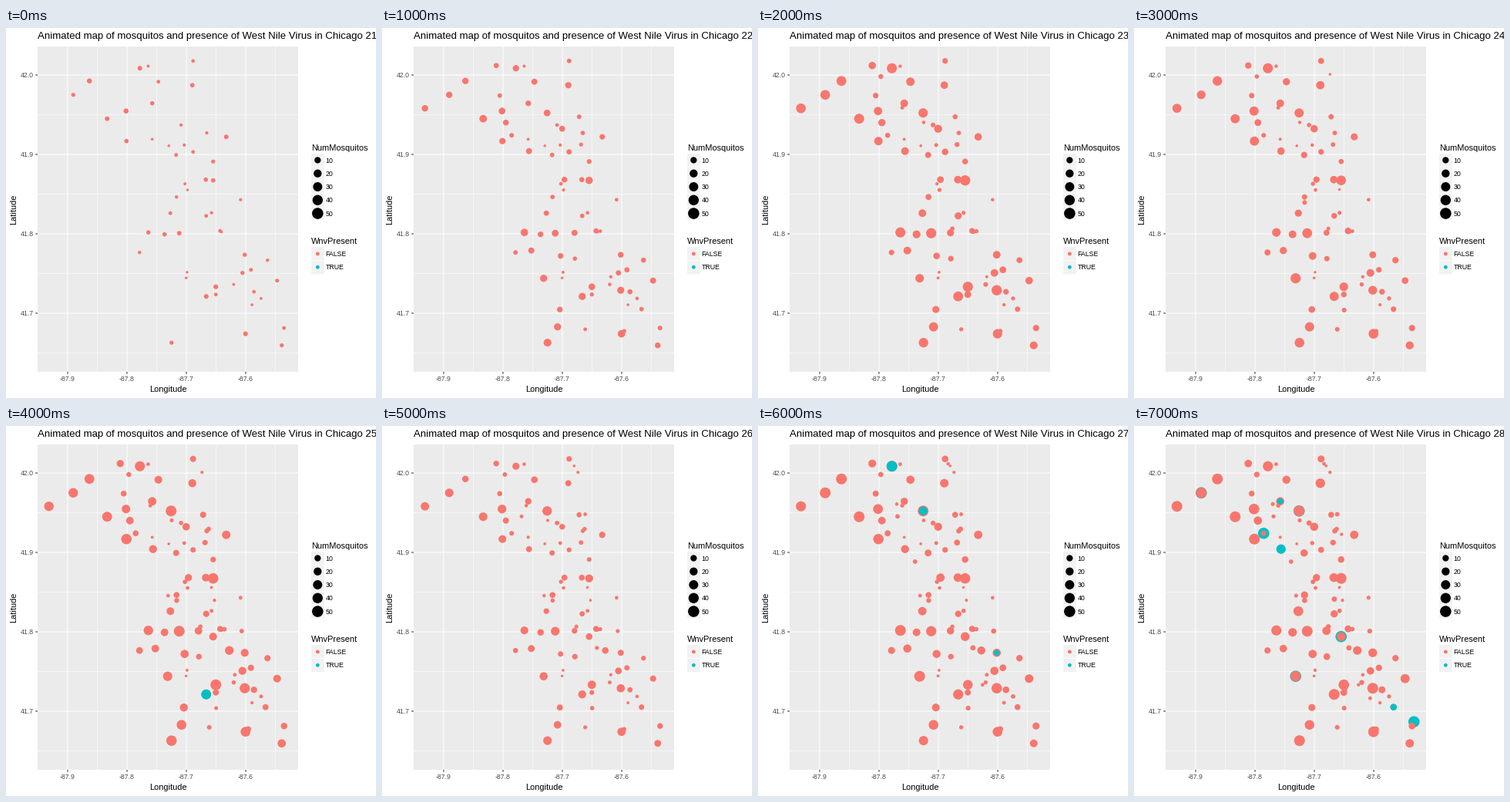
A matplotlib script that plays this animation: 480 px wide and 480 px high, repeating every 8 s.

```python
import numpy as np
import matplotlib.pyplot as plt
from matplotlib.animation import FuncAnimation
from matplotlib.patches import Circle, Rectangle

plt.rcParams["font.family"] = "Liberation Sans"

SIZE, DPI = 480, 72
SALMON, TEAL = "#F8766D", "#00BFC4"
FIRST_WEEK, WEEKS = 21, 8
LEFT, RIGHT, TOP, BOTTOM = 41, 379, 24, 446
MAX_RADIUS = 7

# Main traps: opening week, usual dot radius, places.
MAIN_TRAPS = [
    (21, 6.8, [(174, 52.5), (108.5, 69), (87.5, 87), (156, 108), (131.5, 118), (156.5, 147),
               (269, 198), (185, 265.5), (225, 266.5), (272.5, 336), (260, 348.5),
               (311, 397), (215, 408.5)]),
    (21, 5.4, [(198, 70), (242, 74.5), (190, 98), (286, 141.5), (259.5, 197), (213.5, 240.5),
               (206, 268), (310, 294.5), (307, 318), (352, 328), (358, 412)]),
    (21, 4.2, [(243, 43), (221, 165), (243, 161), (269, 173.5), (221.5, 219.5), (260, 244),
               (278, 263.5), (173.5, 291.5), (339.5, 301.5), (318, 314), (272.5, 346),
               (322, 342.5), (361, 389.5)]),
    (22, 6.8, [(56, 104.5), (214.5, 110.5), (210, 325), (310, 340.5), (228, 388)]),
    (22, 5, [(148.5, 49), (161, 123), (234, 131), (191, 160), (237, 197), (250, 266),
             (194, 289), (232, 296), (231, 365.5)]),
    (22, 3.8, [(153, 88), (256, 115.5), (168.5, 139.5), (258.5, 151.5), (250.5, 299.5),
               (337, 365)]),
    (25, 5.5, [(269, 273.5), (290, 291.5)]),
]
# How far the catches have grown from the smallest dot to their usual size.
SEASON = [0.25, 0.55, 0.9, 0.85, 0.92, 0.68, 1, 1.05]

# Positive catches: rings behind the dots, and (x, y, radius) on top of them.
VIRUS_RINGS = {28: [(87.5, 87), (214.5, 110.5), (168.5, 139.5), (269, 273.5),
                    (210, 325), (363.5, 384)]}
VIRUS_DOTS = {25: [(260, 348.5, 6.4)],
              27: [(174, 52.5, 6.9), (214.5, 110.5, 5.6), (310, 294.5, 3.7)],
              28: [(191, 160, 6.1), (190, 98, 3.8), (337, 365, 4.3)]}


def minor_traps(count):
    """Small traps scattered along the city's north-west to south-east band."""
    rng = np.random.default_rng(7)
    y = rng.uniform(48, 395, count)
    x = 185 + 0.3 * y + rng.uniform(-55, 55, count)
    return np.column_stack([x, y, rng.uniform(1.8, 3.4, count)])


MINOR = minor_traps(44)


def catches(frame):
    week = FIRST_WEEK + frame
    rng = np.random.default_rng(week)
    sites = [(x, y, r) for opened, r, places in MAIN_TRAPS if opened <= week
             for x, y in places]
    sites = np.vstack([sites, MINOR[:16 + 4 * frame]])
    spread = rng.normal(1, 0.06, len(sites))
    grown = 1.7 + (sites[:, 2] - 1.7) * SEASON[frame]
    sites[:, 2] = np.clip(grown * spread, 1.7, MAX_RADIUS)
    return sites.tolist()


def week_dots(frame):
    week = FIRST_WEEK + frame
    rings = [(x, y, MAX_RADIUS + 0.3) for x, y in VIRUS_RINGS.get(week, [])]
    negative, over = catches(frame), VIRUS_DOTS.get(week, [])
    colors = [TEAL] * len(rings) + [SALMON] * len(negative) + [TEAL] * len(over)
    return np.array(rings + negative + over), colors


fig = plt.figure(figsize=(SIZE / DPI, SIZE / DPI), dpi=DPI, facecolor="white")
ax = fig.add_axes([0, 0, 1, 1])
ax.set(xlim=(0, SIZE), ylim=(SIZE, 0))
ax.axis("off")


def box(x, y, w, h, color):
    ax.add_patch(Rectangle((x, y), w, h, fc=color, ec="none", zorder=0))


def line(xs, ys, color="white", width=1.07):
    ax.plot(xs, ys, color=color, lw=width, zorder=1, solid_capstyle="butt", snap=False)


def label(x, y, text, size=8.8, color="black", **kw):
    return ax.text(x, y, text, fontsize=size, color=color, va="baseline", **kw)


def legend(top, title, entries):
    """A titled column of keys; entries are (text, radius, color)."""
    key = 17.28
    label(396, top - 4, title, 11)
    box(395.8, top, key, len(entries) * key, "#F2F2F2")
    for i, (text, r, color) in enumerate(entries):
        y = top + key * (i + 0.5)
        if i:
            line([395.8, 395.8 + key], [y - key / 2] * 2, width=0.8)
        ax.add_patch(Circle((404.3, y), r, fc=color, ec="none", zorder=3))
        label(414.6, y + 3.2, text)


box(LEFT, TOP, RIGHT - LEFT, BOTTOM - TOP, "#EBEBEB")
for i in range(4):
    gx, gy = 80 + 77 * i, 61 + 103 * i
    line([gx + 38.5] * 2, [TOP, BOTTOM], width=0.53)
    line([LEFT, RIGHT], [gy + 51.5] * 2, width=0.53)
for i in range(4):
    gx, gy = 80 + 77 * i, 61 + 103 * i
    line([gx] * 2, [TOP, BOTTOM])
    line([LEFT, RIGHT], [gy] * 2)
    line([gx] * 2, [BOTTOM, BOTTOM + 2.75], "#333333")
    line([LEFT - 2.75, LEFT], [gy] * 2, "#333333")
    label(gx, 458, f"{-87.9 + i / 10:.1f}", color="#4D4D4D", ha="center")
    label(36.3, gy + 3.2, f"{42 - i / 10:.1f}", color="#4D4D4D", ha="right")

label(210, 472, "Longitude", 11, ha="center")
label(13, 235, "Latitude", 11, ha="center", rotation=90, rotation_mode="anchor")
legend(162.8, "NumMosquitos",
       [(str(n), 1.6 + 0.8 * np.sqrt(n), "black") for n in range(10, 60, 10)])
legend(284.3, "WnvPresent", [("FALSE", 2.4, SALMON), ("TRUE", 2.4, TEAL)])

title = label(41, 14, "", 13.2)
dots = ax.scatter([], [], linewidths=0, zorder=2)


def draw(frame):
    data, colors = week_dots(frame)
    title.set_text("Animated map of mosquitos and presence of "
                   f"West Nile Virus in Chicago {FIRST_WEEK + frame}")
    dots.set_offsets(data[:, :2] - 0.3)
    dots.set_sizes(4 * data[:, 2] ** 2)
    dots.set_facecolors(colors)
    return title, dots


anim = FuncAnimation(fig, draw, frames=WEEKS, interval=1000, repeat=True, repeat_delay=0)
plt.show()
```
